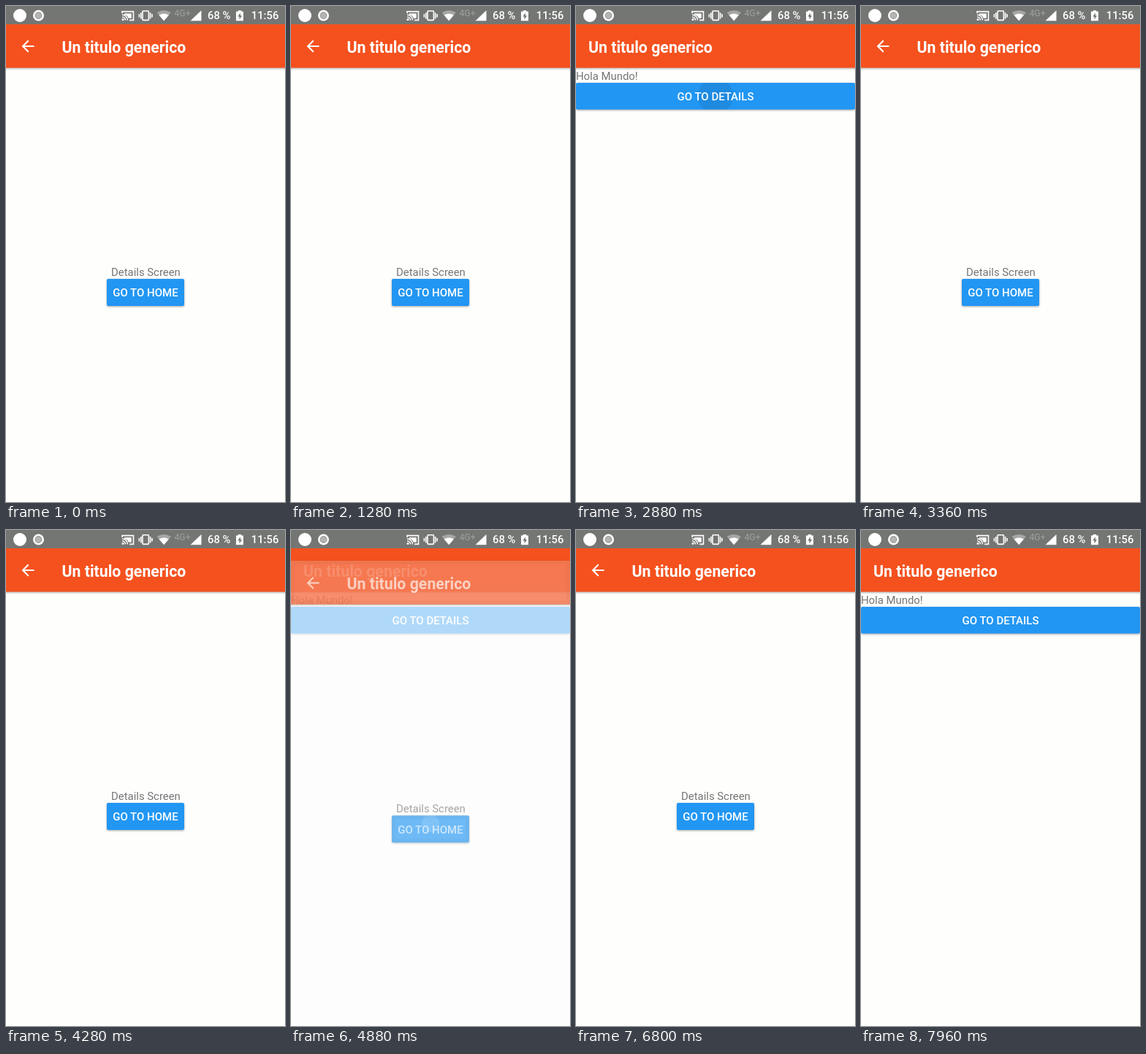
Write an HTML page that moves like this. It is 382 px wide and 678 px high and loops after 8 s.

```html
<!DOCTYPE html>
<html lang="es">
<head>
<meta charset="utf-8">
<title>Un titulo generico</title>
<style>
  html, body { margin: 0; width: 100%; height: 100%; overflow: hidden; background: #fefefd; }
  svg { display: block; width: 382px; height: 678px; font-family: Roboto, sans-serif; }
  .title { font-size: 21.3px; font-weight: 700; fill: #fff; }
  .label { font-size: 14.9px; fill: #757575; }
  .action { font-size: 15px; font-weight: 500; fill: #fff; text-anchor: middle; }
  .bar { fill: #f4511e; filter: drop-shadow(0 1.5px 1.5px rgba(0, 0, 0, .35)); }
  .button { fill: #2196f3; filter: drop-shadow(0 1.5px 1.5px rgba(0, 0, 0, .35)); }
  .rim { fill: none; stroke: #000; stroke-width: 5; }
  .status { font-size: 14.8px; font-weight: 500; fill: #fff; }
</style>
</head>
<body>
<svg viewBox="0 0 382 678">
  <defs>
    <clipPath id="homeClip"><rect y="105" width="382" height="36.5" rx="2"/></clipPath>
    <clipPath id="detailsClip"><rect x="138" y="373" width="106" height="37" rx="2"/></clipPath>
  </defs>
  <rect width="382" height="678" fill="#fefefd"/>

  <g id="home">
    <rect class="bar" x="-6" y="25" width="394" height="59.5"/>
    <text class="title" x="17" y="64">Un titulo generico</text>
    <text class="label" x="0" y="101">Hola Mundo!</text>
    <rect class="button" y="105" width="382" height="36.5" rx="2"/>
    <g clip-path="url(#homeClip)"><circle id="homeRipple" cx="191" cy="123" opacity="0"/></g>
    <text class="action" x="191" y="129.3">GO TO DETAILS</text>
  </g>

  <!-- Each layer fades on its own, so the white card shows through the ones above it. -->
  <g id="details">
    <rect class="fade" y="25" width="382" height="660" fill="#fefefd"/>
    <rect class="fade bar" x="-6" y="25" width="394" height="59.5"/>
    <rect class="rim" x="2.5" y="27.5" width="377" height="54.5"/>
    <path class="fade" fill="#fff" transform="translate(17.3 42.3) scale(1.06)"
      d="M20 11H7.83l5.59-5.59L12 4l-8 8 8 8 1.41-1.41L7.83 13H20z"/>
    <text class="fade title" x="76.5" y="64">Un titulo generico</text>
    <text class="fade label" x="144" y="369">Details Screen</text>
    <rect class="fade button" x="138" y="373" width="106" height="37" rx="2"/>
    <rect class="rim" x="140.5" y="375.5" width="101" height="32"/>
    <g clip-path="url(#detailsClip)"><circle id="detailsRipple" cx="191" cy="384" fill="#fff" opacity="0"/></g>
    <text class="fade action" x="191" y="397.3">GO TO HOME</text>
  </g>

  <g id="statusBar" fill="#fff">
    <rect width="382" height="25" fill="#747673"/>
    <circle cx="19" cy="13" r="9"/>
    <circle cx="44.5" cy="13" r="7.5"/>
    <circle cx="44.5" cy="13" r="4.4" fill="#b5b6b4" stroke="#8a8c89"/>
    <g fill="none" stroke="#fff" stroke-width="1.6">
      <path d="M159 10V7.6h15.5v11.8H169M159 12a7.5 7.5 0 0 1 7.5 7.5M159 15a4.5 4.5 0 0 1 4.5 4.5"/>
      <rect x="187" y="6.8" width="8.4" height="12.6" rx="1"/>
      <path d="M184.8 9v8.4M197.6 9v8.4M182.4 11v4.4M200 11v4.4"/>
    </g>
    <path d="M162 10.3h9.7v6.4h-4q-1-4-5.7-5z"/>
    <circle cx="160" cy="18.6" r="1.5"/>
    <path d="M206.5 9q9.7-6 19.4 0L216.2 20.3z" fill="#a6a7a5"/>
    <path d="M209.5 12.4q6.7-3.6 13.4 0L216.2 20.3z"/>
    <text x="230.5" y="13.8" font-size="12.2" fill="#a0a19f">4G+</text>
    <path d="M267.5 6v14.3H252.5z"/>
    <text class="status" x="276" y="18.3">68 %</text>
    <path d="M315 7.6h2.8V6h4.4v1.6h2.8v12.7h-10z"/>
    <path d="M321 9.4l-3.8 5.2h2.3v3.9l3.6-5.3h-2.1z" fill="#747673"/>
    <text class="status" x="335.8" y="18.3">11:56</text>
  </g>
</svg>
<script>
  const LOOP = 8000, PUSH = 350, POP = 230, DROP = 53;
  // Navigation start times; the loop opens on the details screen.
  const moves = [
    { at: 1347, to: 'home' },
    { at: 3021, to: 'details' },
    { at: 4707, to: 'home' },
    { at: 5861, to: 'details' },
    { at: 7267, to: 'home' },
  ];

  const byId = id => document.getElementById(id);
  const details = byId('details');
  const fades = details.querySelectorAll('.fade');
  const rims = details.querySelectorAll('.rim');
  const clamp = v => Math.min(1, Math.max(0, v));

  // Piecewise fade used while the card rises.
  function riseAlpha(p) {
    if (p < .5) return p * .5;
    if (p < .9) return .25 + (p - .5) * 1.125;
    return .7 + (p - .9) * 3;
  }

  function cardState(t) {
    const move = moves.filter(m => t >= m.at).pop();
    if (!move) return { progress: 1, alpha: 1 };
    if (move.to === 'details') {
      const progress = 1 - (1 - clamp((t - move.at) / PUSH)) ** 5;
      return { progress, alpha: riseAlpha(progress) };
    }
    const progress = 1 - clamp((t - move.at) / POP) ** 4;
    return { progress, alpha: progress * .96 + .04 * progress ** 8 };
  }

  function ripple(id, t, target, lead, fade, radius, strength) {
    const move = moves.find(m => m.to === target && t >= m.at - lead && t < m.at + fade);
    const circle = byId(id);
    if (!move) return circle.setAttribute('opacity', 0);
    const grow = clamp((t - move.at + lead) / lead);
    const rest = 1 - clamp((t - move.at) / fade);
    circle.setAttribute('r', radius * grow);
    circle.setAttribute('opacity', strength * rest);
  }

  function draw(now) {
    const t = now % LOOP;
    const { progress, alpha } = cardState(t);
    details.style.display = alpha > 0 ? '' : 'none';
    details.setAttribute('transform', `translate(0 ${(DROP * (1 - progress)).toFixed(2)})`);
    fades.forEach(el => el.setAttribute('opacity', alpha));
    rims.forEach(el => el.setAttribute('opacity', .12 * alpha * (1 - alpha)));
    ripple('homeRipple', t, 'details', 160, 160, 195, .08);
    ripple('detailsRipple', t, 'home', 67, 300, 12, .3);
    requestAnimationFrame(() => draw(performance.now()));
  }
  draw(performance.now());
</script>
</body>
</html>
```
